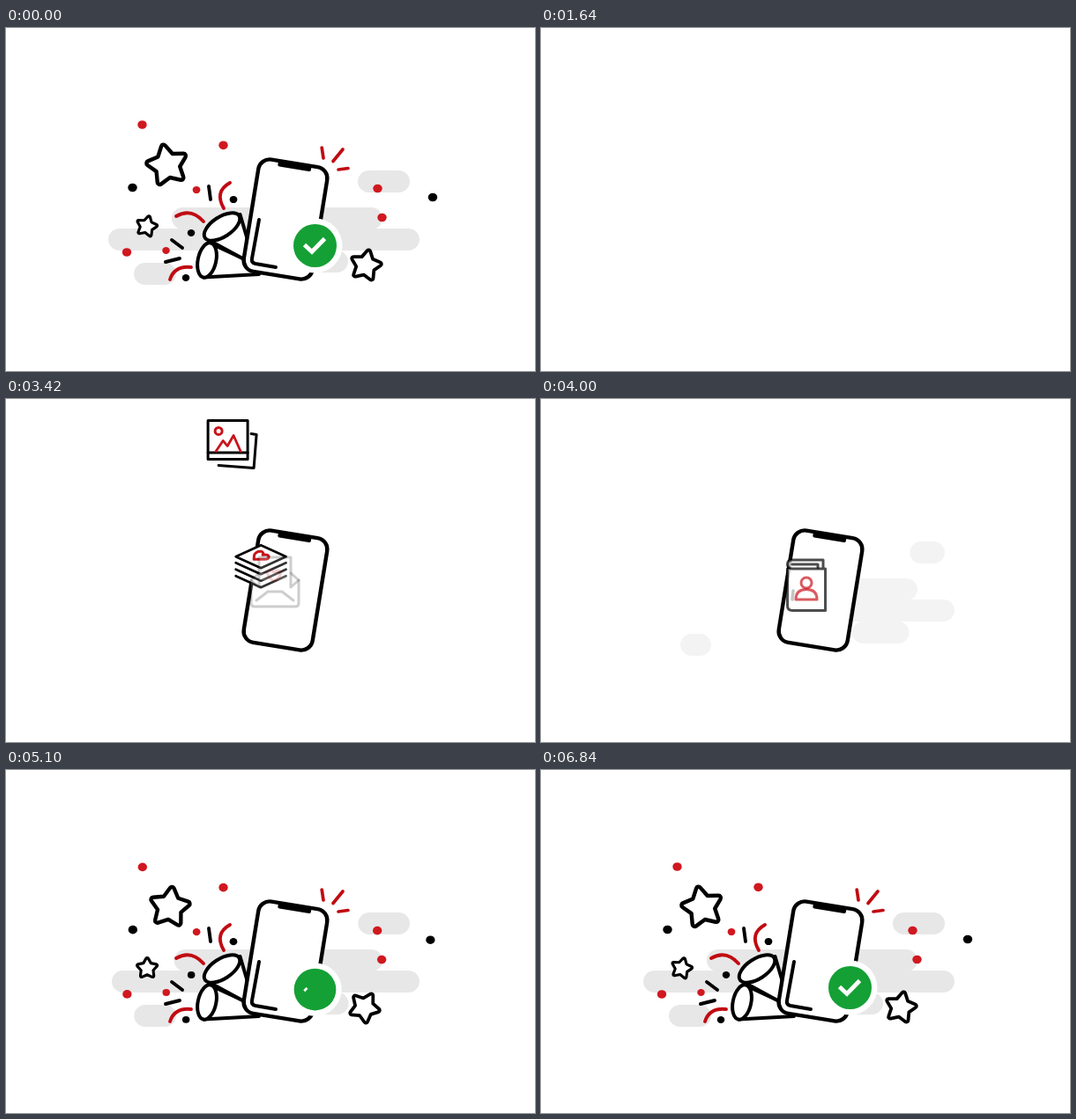
Write an HTML page with a canvas that moves like this. It is 600 px wide and 390 px high and loops after 6860 ms.

```html
<!DOCTYPE html>
<html>
<head>
<meta charset="utf-8">
<style>
html, body { margin: 0; width: 100%; height: 100%; overflow: hidden; background: #fff; }
canvas { display: block; width: 600px; height: 390px; }
</style>
</head>
<body>
<canvas id="stage" width="600" height="390"></canvas>
<script>
const LOOP = 6860, BLACK = '#000', RED = '#c8141b', DEEP_RED = '#c00b12', GREEN = '#14a035', CLOUD = '#e7e7e7';
const ctx = document.getElementById('stage').getContext('2d');
ctx.lineCap = ctx.lineJoin = 'round';

const clamp = v => Math.max(0, Math.min(1, v));
const ramp = (t, from, to) => clamp((t - from) / (to - from));
const smooth = v => (1 - Math.cos(Math.PI * v)) / 2;
const settle = (t, from, span) => t < from ? 0 : 1 - Math.exp((from - t) / span);
const mix = (a, b, p) => a + (b - a) * p;

function group(x, y, scale, angle, draw) {
  ctx.save();
  ctx.translate(x, y);
  ctx.scale(scale, scale);
  ctx.rotate(angle * Math.PI / 180);
  draw();
  ctx.restore();
}

function line(d, color = BLACK, width = 3, fill) {
  const path = new Path2D(d);
  if (fill) { ctx.fillStyle = fill; ctx.fill(path); }
  ctx.strokeStyle = color;
  ctx.lineWidth = width;
  ctx.stroke(path);
}

function oval(x, y, rx, ry, angle, fill, stroke, width) {
  ctx.beginPath();
  ctx.ellipse(x, y, rx, ry, angle * Math.PI / 180, 0, Math.PI * 2);
  if (fill) { ctx.fillStyle = fill; ctx.fill(); }
  if (stroke) { ctx.strokeStyle = stroke; ctx.lineWidth = width; ctx.stroke(); }
}

// Reveals a stroke of the given length from its start.
function trace(d, length, p, color, width) {
  if (p <= 0) return;
  ctx.setLineDash([length * p, length * 2]);
  line(d, color, width);
  ctx.setLineDash([]);
}

// Left and right ends and top; each bar grows leftwards from a circle.
const bars = [[399, 458, 162], [188, 427, 204], [116, 469, 228], [300, 388, 253], [145, 193, 267]];

function clouds(t) {
  const p = settle(t, 3840, 286);
  ctx.globalAlpha = ramp(t, 3840, 4160);
  ctx.fillStyle = CLOUD;
  ctx.beginPath();
  bars.forEach(([left, end, y], i) => {
    const right = i === 3 ? mix(440, end, p) : end;
    const x = mix(right - 25, left, p);
    ctx.roundRect(x, y, right - x, 25, 12.5);
  });
  ctx.fill();
  ctx.globalAlpha = 1;
}

const dots = [
  [154.5, 110, 5], [246.5, 133.3, 5], [216, 184, 4.2], [181.5, 253, 4.1], [137, 255, 5],
  [421.5, 182.5, 5], [426.5, 215.5, 5],
  [143.5, 181.5, 5, BLACK], [258, 195, 4.2, BLACK], [210, 233, 4.1, BLACK],
  [204, 284, 4.1, BLACK], [484, 192.5, 5, BLACK, 145]
];
const streamers = [
  ['M254 176Q236 186 247 205', DEEP_RED], ['M193 214Q210 204 224 220', DEEP_RED], ['M186 286Q191 270 210 272', DEEP_RED],
  ['M230 180L232 195', BLACK], ['M188 241L200 250', BLACK], ['M181 266L197 262', BLACK]
];

function confetti(t) {
  for (const [x, y, r, color = '#d0181f', span = 105] of dots) {
    const p = settle(t, 4500, span);
    if (p) oval(mix(x > 300 ? 318 : 250, x, p), mix(235, y, p), r * 1.04 * p, r * 0.97 * p, 0, color);
  }
  const p = settle(t, 4480, 85);
  if (p) group(mix(250, 0, p), mix(245, 0, p), p, 0, () => streamers.forEach(([d, color]) => line(d, color, 3.9)));
}

function star(x, y, size, angle, span, t) {
  const p = settle(t, 4500, span);
  if (!p) return;
  const corner = i => {
    const a = (i * 36 - 90) * Math.PI / 180, r = i % 2 ? size * 0.54 : size;
    return [r * Math.cos(a), r * Math.sin(a)];
  };
  group(mix(300, x, p), y, p, angle, () => {
    ctx.beginPath();
    ctx.moveTo(...corner(-1));
    for (let i = 0; i < 10; i += 2) {
      ctx.arcTo(...corner(i), ...corner(i + 1), size * 0.1);
      ctx.lineTo(...corner(i + 1));
    }
    ctx.closePath();
    ctx.fillStyle = '#fff';
    ctx.fill();
    ctx.strokeStyle = BLACK;
    ctx.lineWidth = 1.8 + size * 0.1;
    ctx.stroke();
  });
}

function stars(t) {
  const turn = Math.exp((5100 - t) / 280);
  star(183, 156, 26.5, -12 + 19 * turn, 160, t);
  star(408, 270, 20, 12 + 18 * turn, 140, t);
  star(159.5, 225.5, 13.5, 14 - 14 * turn, 110, t);
}

function cones(t) {
  const p = settle(t, 4380, 80);
  if (!p) return;
  group(mix(285, 0, p), mix(265, 0, p), p, 0, () => {
    line('M232 245L275 265L287 280L224 283.5', BLACK, 4, '#fff');
    oval(228, 264, 10.3, 20, 12, '#fff', BLACK, 4);
    line('M265.5 212L274 241L272 264L226 239', BLACK, 4, '#fff');
    oval(245, 226, 23, 11.3, -33, '#fff', BLACK, 4);
  });
}

function phone(t) {
  ctx.globalAlpha = ramp(t, 2440, 2640);
  group(317, 217.5, 1, 9.2 * smooth(ramp(t, 2440, 3440)), () => {
    ctx.beginPath();
    ctx.roundRect(-39.5, -64.5, 79, 129, 13);
    ctx.fillStyle = '#fff';
    ctx.fill();
    ctx.strokeStyle = BLACK;
    ctx.lineWidth = 4.4;
    ctx.stroke();
    ctx.beginPath();
    ctx.roundRect(-18.5, -65, 38, 7, 2);
    ctx.fillStyle = BLACK;
    ctx.fill();
  });
  ctx.globalAlpha = 1;
  trace('M287 218L279 262Q278 267 283 268L306 272', 78, smooth(ramp(t, 4560, 4900)), BLACK, 4);
  const p = smooth(ramp(t, 4600, 4900));
  trace('M360 148L358.2 136', 13, p, DEEP_RED, 3.7);
  trace('M371 151.5L382 138', 18, p, DEEP_RED, 3.7);
  trace('M377 161L388 159.5', 12, p, DEEP_RED, 3.7);
}

function mail() {
  line('M-18 -10L-27 -2V24Q-27 28 -23 28H23Q27 28 27 24V-2L18 -10', BLACK, 3, '#fff');
  line('M-27 -2L-18 6V-28H18V6L27 -2', BLACK, 3, '#fff');
  line('M-1 -1C-10 -6 -10 -13 -5 -13Q-2 -13 -1 -10Q0 -13 3 -13C8 -13 8 -6 -1 -1Z', RED, 3);
  line('M-21 21L-8 11H8L21 21');
}

function cards() {
  for (const y of [22, 14.5, 7]) line(`M-28.5 ${y - 11}L0 ${y + 2}L28.5 ${y - 11}`, BLACK, 2.6, '#fff');
  line('M-28.5 -11L0 -24L28.5 -11L0 2Z', BLACK, 2.6, '#fff');
  line('M-8 -8L-7.5 -13Q-5 -17.5 0 -17Q4 -15.5 2 -13Q8 -14 9 -11Q9 -8 4 -8Z', RED, 3);
}

function photos() {
  line('M21 -12L27 -11L24 27L-16 24');
  line('M-28 -27H17V17H-28Z', BLACK, 3, '#fff');
  line('M-28 9.5H17');
  oval(-16, -15, 4, 4, 0, null, RED, 3);
  line('M-19 8L-11 -4L-6 2L1 -10L9 8', RED, 2.8);
}

function book() {
  line('M-21.5 -18V24Q-21.5 29.5 -16 29.5H21.5V-18H-17Q-21.5 -19 -21.5 -23Q-21.5 -28 -16.5 -28H19V-18', BLACK, 3, '#fff');
  line('M-16 -23H13V-19.5');
  line('M-15 7L-16 17', '#aaa', 3.5);
  oval(0, -2, 6, 6, 0, null, RED, 3);
  line('M-12 17Q-12 5.5 0 5.5Q12 5.5 12 17Z', RED, 3);
}

// Shared falling path: age, x, y.
const fall = [[-340, 243, -60], [-160, 247, -11], [0, 257, 51], [120, 269, 106], [240, 289, 190], [340, 301, 211], [480, 305, 208]];
const icons = [[book, 3660], [photos, 3420], [cards, 3180], [mail, 2940]];

function falling(t) {
  for (const [draw, start] of icons) {
    const age = t - start;
    if (age < -340 || age > 540) continue;
    const next = fall.findIndex(k => k[0] > age);
    const i = next < 0 ? fall.length - 1 : next;
    const [from, x, y] = fall[i - 1], [to, endX, endY] = fall[i];
    const p = ramp(age, from, to);
    ctx.globalAlpha = 1 - ramp(age, 256, 536);
    group(mix(x, endX, p), mix(y, endY, p), 1, 0, draw);
  }
  ctx.globalAlpha = 1;
}

function badge(t) {
  const p = settle(t, 4700, 110);
  if (!p) return;
  group(350.5, 247.5 + 30 * Math.exp((4700 - t) / 150), p, 0, () => {
    oval(0, 0, 31, 31, 0, '#fff');
    oval(0, 0, 24.5, 24.5, 0, GREEN);
    ctx.lineCap = 'butt';
    ctx.lineJoin = 'miter';
    trace('M-12 -1L-3.5 7L11 -8', 33, smooth(ramp(t, 5030, 5400)), '#fff', 4.8);
  });
}

function render(t) {
  ctx.fillStyle = '#fff';
  ctx.fillRect(0, 0, 600, 390);
  const wrapped = t < 2440;
  const time = wrapped ? t + LOOP : t;
  for (const part of [clouds, confetti, cones, phone, stars, falling, badge]) part(time);
  if (wrapped) {
    ctx.globalAlpha = ramp(t, 1070, 1640);
    ctx.fillStyle = '#fff';
    ctx.fillRect(0, 0, 600, 390);
    ctx.globalAlpha = 1;
  }
}

const begin = performance.now();
function tick() {
  render((performance.now() - begin) % LOOP);
  requestAnimationFrame(tick);
}
tick();
</script>
</body>
</html>
```
